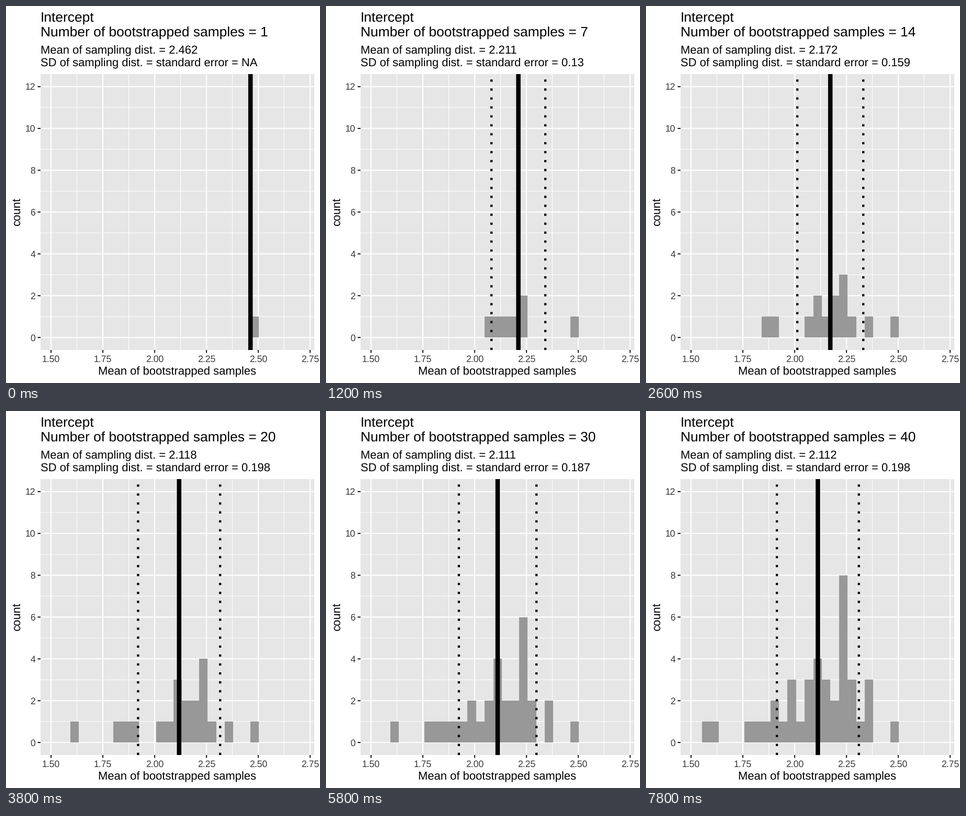
Animation of 600 by 720 pixels, one loop 8 s. Source, as a matplotlib script:

```python
import numpy as np
import matplotlib.pyplot as plt
from matplotlib.animation import FuncAnimation
from matplotlib.patches import Rectangle

plt.rcParams["font.family"] = "Liberation Sans"
plt.rcParams["text.hinting"] = "none"

W, H, DPI = 600, 720, 100
LEFT, RIGHT, TOP, BOTTOM = 66, 589, 130, 657
PANEL, BAR, TICK, TICK_TEXT = "#E6E6E6", "#989898", "#212121", "#383838"
BIN = 1.2 / 29
FIRST, BINS = 38, 23

# bootstrap means, in thousandths away from 2.2
OFFSETS = [262.4, 40, -95, 10, -135, 44.6, -50,
           75, -299, -5, 155, -95, 30, -330,
           -594, 34, -380, -90, -175, -43,
           25, -139, -258, -95, -218,
           42, -402, 78, -205, 142,
           42, -125, -290, 158, 44, -210, 78, 117, -622, -42]
MEANS = 2.2 + np.array(OFFSETS) / 1000


def px(v):
    return 86.07 + 396 * (v - 1.5)


def py(v):
    return 633.05 - 39.92 * v


def pts(pixels):
    return pixels * 72 / DPI


fig = plt.figure(figsize=(W / DPI, H / DPI), dpi=DPI, facecolor="white")
ax = fig.add_axes([0, 0, 1, 1])
ax.set_xlim(0, W)
ax.set_ylim(H, 0)
ax.axis("off")


def line(xs, ys, width, color, z, **kw):
    return ax.plot(xs, ys, lw=pts(width), color=color, zorder=z, snap=False,
                   solid_capstyle="butt", dash_capstyle="butt", **kw)[0]


def label(x, y, s, size, color="black", **kw):
    return ax.text(x, y, s, fontsize=pts(size), color=color,
                   ha="left", va="baseline", **kw)


def grid(xs, ys, width, z):
    for v in xs:
        line([px(v)] * 2, [BOTTOM, TOP], width, "white", z)
    for v in ys:
        line([LEFT, RIGHT], [py(v)] * 2, width, "white", z)


x_ticks = np.arange(1.5, 2.8, 0.25)
y_ticks = range(0, 13, 2)
ax.add_patch(Rectangle((LEFT, TOP), RIGHT - LEFT, BOTTOM - TOP,
                       fc=PANEL, lw=0, zorder=0))
grid(x_ticks[:-1] + 0.125, range(1, 12, 2), 1.07, 1)
grid(x_ticks, y_ticks, 2.13, 2)

for v in x_ticks:
    line([px(v)] * 2, [BOTTOM, BOTTOM + 5.5], 2.13, TICK, 2)
    label(px(v) - 17.1, 679.7, f"{v:.2f}", 17.6, TICK_TEXT)
for v in y_ticks:
    line([LEFT - 5.5, LEFT], [py(v)] * 2, 2.13, TICK, 2)
    label(56.1 - 9.79 * len(str(v)), py(v) + 6.3, str(v), 17.6, TICK_TEXT)

label(176.5, 704.8, "Mean of bootstrapped samples", 22)
label(26.9, 420.4, "count", 22, rotation=90, rotation_mode="anchor")
label(LEFT, 30.3, "Intercept", 26.4)
title = label(LEFT, 59, "", 26.4)
mean_text = label(LEFT, 91, "", 22)
sd_text = label(LEFT, 115, "", 22)

edges = np.round(px((FIRST - 0.5 + np.arange(BINS + 1)) * BIN))
bars = [ax.add_patch(Rectangle((a, 633), b - a, 0, fc=BAR, lw=0,
                               antialiased=False, zorder=3))
        for a, b in zip(edges[:-1], edges[1:])]
dots = [line([0, 0], [BOTTOM, TOP], 4.27, "black", 4, linestyle=(0, (1, 3)))
        for _ in range(2)]
centre = line([0, 0], [BOTTOM, TOP], 8.53, "black", 5)


def draw(i):
    n = i + 1
    seen = MEANS[:n]
    mean = seen.mean()
    sd = seen.std(ddof=1) if n > 1 else None

    title.set_text(f"Number of bootstrapped samples = {n}")
    mean_text.set_text(f"Mean of sampling dist. = {round(mean, 3):g}")
    shown = "NA" if sd is None else f"{round(sd, 3):g}"
    sd_text.set_text(f"SD of sampling dist. = standard error = {shown}")

    slots = np.floor(seen / BIN + 0.5).astype(int) - FIRST
    for bar, count in zip(bars, np.bincount(slots, minlength=BINS)):
        bar.set_height(round(py(count)) - 633)

    centre.set_xdata([px(mean)] * 2)
    for dot, side in zip(dots, (-1, 1)):
        dot.set_visible(sd is not None)
        dot.set_xdata([px(mean + side * (sd or 0))] * 2)
    return [title, mean_text, sd_text, centre, *dots, *bars]


anim = FuncAnimation(fig, draw, frames=len(MEANS), interval=200,
                     init_func=lambda: draw(0), repeat=True, repeat_delay=0)
plt.show()
```
